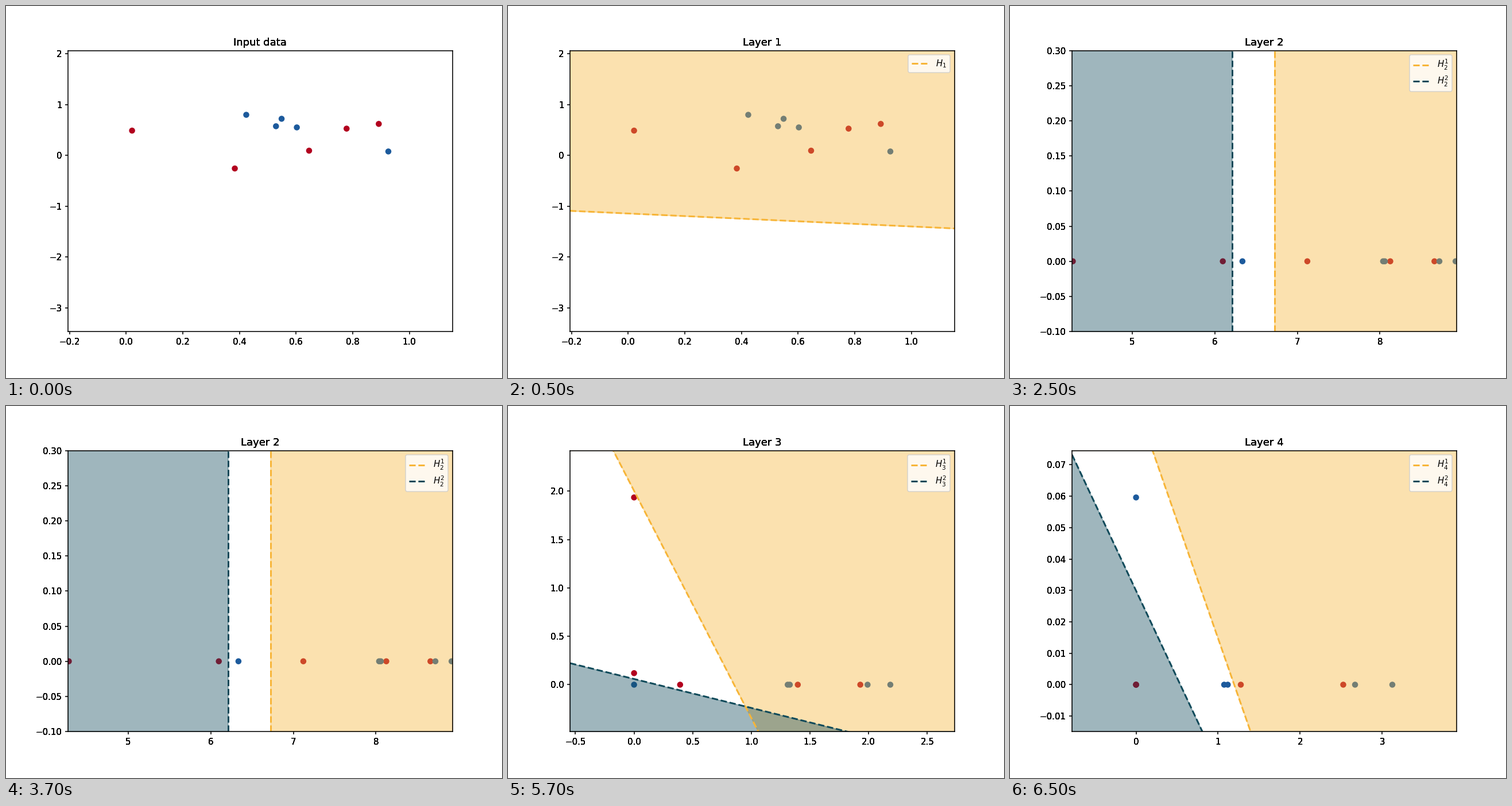
Recreate the animation shown at these times as a matplotlib script. Size 864x648 px, loop 8 s.

```python
import numpy as np
import matplotlib.pyplot as plt
from matplotlib.animation import FuncAnimation

RED, BLUE = "#b2001e", "#1c5a9c"
ORANGE, TEAL = "#f7b538", "#0f4a5a"

plt.rcParams.update({
    "axes.linewidth": 1.05,
    "xtick.major.width": 1.05,
    "ytick.major.width": 1.05,
    "legend.labelspacing": .33,
})

INPUT_RED = [(.0211, .488), (.3839, -.258), (.6462, .093), (.7786, .527), (.8922, .620)]
INPUT_BLUE = [(.4243, .799), (.5293, .574), (.5491, .721), (.6029, .551), (.9260, .077)]


def on_axis(*xs):
    return [(x, 0) for x in xs]


# Hyperplanes are (slope, intercept); a slope of None means a vertical line.
LAYERS = [
    dict(title="Input data", red=INPUT_RED, blue=INPUT_BLUE,
         xlim=(-.2051, 1.1522), ylim=(-3.469, 2.063), planes=[]),
    dict(title="Layer 1", red=INPUT_RED, blue=INPUT_BLUE,
         xlim=(-.2051, 1.1522), ylim=(-3.469, 2.063), planes=[(-.2557, -1.1444)]),
    dict(title="Layer 2",
         red=on_axis(4.28, 6.097, 7.121, 8.126, 8.661),
         blue=on_axis(6.335, 8.039, 8.060, 8.721, 8.917),
         xlim=(4.27, 8.927), ylim=(-.1, .3), planes=[(None, 6.728), (None, 6.212)]),
    dict(title="Layer 3",
         red=[(0, 1.9357), (0, .1194)] + on_axis(.3926, 1.396, 1.929),
         blue=on_axis(0, 1.310, 1.328, 1.991, 2.185),
         xlim=(-.5463, 2.7313), ylim=(-.4839, 2.4196),
         planes=[(-2.349, 2.004), (-.2994, .059)]),
    dict(title="Layer 4",
         red=on_axis(0, 0, 0, 1.277, 2.526),
         blue=[(0, .0596)] + on_axis(1.074, 1.118, 2.670, 3.1246),
         xlim=(-.7811, 3.9057), ylim=(-.0149, .0745),
         planes=[(-.07487, .0896), (-.05545, .0299)]),
]

fig = plt.figure(figsize=(8, 6), dpi=108)
ax = fig.add_axes([.125, .125, .775, .755])


def harden(image, dpi):
    """Make the soft edges of lettering nearly solid."""
    image = image.copy()
    image[..., 3] = np.clip(2.5 * image[..., 3], 0, 1)
    return image, 0, 0


def draw_plane(plane, layer, color, positive, label):
    """Dashed hyperplane with its active side shaded."""
    slope, offset = plane
    xlim, ylim = np.array(layer["xlim"]), np.array(layer["ylim"])
    shade = dict(color=color, alpha=.4)
    if slope is None:
        xs, ys = np.full(2, offset), ylim
        ax.fill_betweenx(ys, xs, xlim[int(positive)], **shade)
    else:
        xs, ys = xlim, slope * xlim + offset
        ax.fill_between(xs, ys, ylim[int(positive)], **shade)
    ax.plot(xs, ys, "--", color=color, lw=2, label=label)


def update(frame):
    index = (frame + 3) // 4
    layer = LAYERS[index]
    ax.clear()

    # One call with a colour per point keeps the dots at sub-pixel positions.
    red, blue = layer["red"], layer["blue"]
    ax.scatter(*zip(*red, *blue), s=36, c=[RED] * len(red) + [BLUE] * len(blue))

    planes = layer["planes"]
    for i, (plane, color) in enumerate(zip(planes, (ORANGE, TEAL))):
        power = f"^{i + 1}" if len(planes) > 1 else ""
        draw_plane(plane, layer, color, i == 0, f"$H_{index}{power}$")
    if planes:
        ax.legend(loc="upper right")

    ax.set(xlim=layer["xlim"], ylim=layer["ylim"])
    title = ax.set_title(layer["title"])
    for text in [title, *ax.get_xticklabels(), *ax.get_yticklabels()]:
        text.set_agg_filter(harden)
    return []


anim = FuncAnimation(fig, update, frames=16, interval=500,
                     init_func=lambda: update(0), repeat=True, repeat_delay=0)
plt.show()
```
